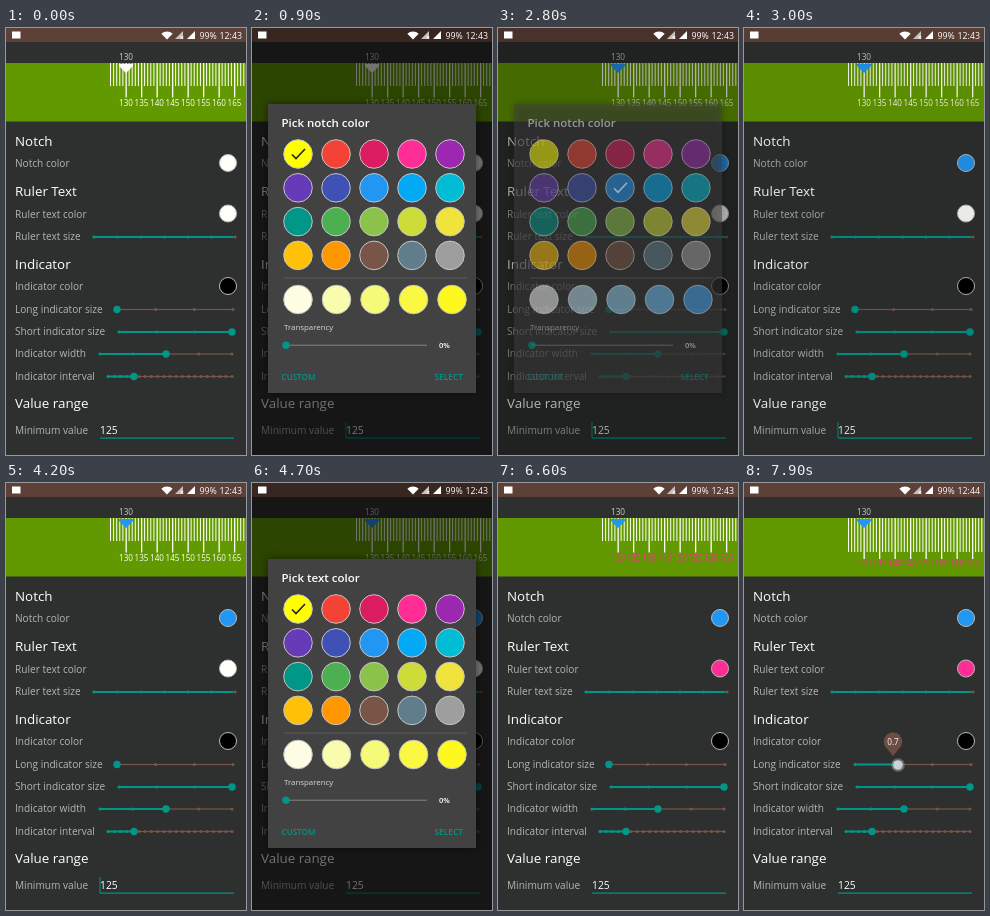
An HTML page with a canvas for the animation above (8000 ms loop, 240x427 px).

```html
<!DOCTYPE html>
<html lang="en">
<head>
<meta charset="utf-8">
<title>Ruler settings</title>
<style>
html, body { margin: 0; width: 100%; height: 100%; overflow: hidden; background: #2e302f; }
canvas { display: block; width: 100vw; height: 100vh; }
</style>
</head>
<body>
<canvas></canvas>
<script>
const canvas = document.querySelector('canvas');
const ctx = canvas.getContext('2d');
const W = 240, H = 427, LOOP = 8000;
const TEAL = '#009688', BROWN = '#795548', WHITE = '#fffffa', BLUE = '#2196f3', PINK = '#ff2d95';
const PALETTE = [
  '#ffff00', '#f44336', '#dc1c60', PINK, '#9c27b0',
  '#673ab7', '#3f51b5', BLUE, '#03a9f4', '#00bcd4',
  TEAL, '#4caf50', '#8bc34a', '#cddc39', '#f0e33c',
  '#ffc107', '#ff9800', BROWN, '#607d8b', '#9e9e9e'
];
const SHADES = {
  0: ['#fcfde2', '#f8fcac', '#f5fb76', '#fbf843', '#fdf81e'],
  3: ['#fff5f0', '#fbd0e4', '#f5a0cb', '#fb6fb6', '#ff4aa5'],
  7: ['#f4f6f5', '#bcdff0', '#94cdee', '#70bff5', '#45a6f5']
};

// [time, value] steps, linear between neighbours
const SCRIM = [[600, 0], [900, 1], [2700, 1], [2800, .55], [2900, .3], [3000, .14], [3100, 0],
  [4200, 0], [4500, 1], [6400, 1], [6500, .4], [6600, 0]];
const DIALOG = [[500, 0], [800, 1], [2700, 1], [2800, .5], [2900, 0],
  [4200, 0], [4500, 1], [6400, 1], [6500, .3], [6600, 0]];
const DRAG = [[7400, 111], [7500, 115], [7600, 126], [7700, 139], [7800, 149], [7900, 152]];
// start, end, x, y
const TOUCHES = [
  [300, 600, 222, 136], [1700, 1900, 127, 166], [2200, 2500, 200, 343],
  [3900, 4100, 222, 186], [5600, 5900, 161, 127], [6200, 6400, 200, 343]
];

function at(steps, t) {
  if (t <= steps[0][0]) return steps[0][1];
  for (let i = 1; i < steps.length; i++) {
    const [t0, a] = steps[i - 1], [t1, b] = steps[i];
    if (t <= t1) return a + (b - a) * (t - t0) / (t1 - t0);
  }
  return steps[steps.length - 1][1];
}

function rect(x, y, w, h, color) {
  ctx.fillStyle = color;
  ctx.fillRect(x, y, w, h);
}

function disc(x, y, r, color, stroke) {
  ctx.beginPath();
  ctx.arc(x, y, r, 0, Math.PI * 2);
  ctx.fillStyle = color;
  ctx.fill();
  if (stroke) { ctx.strokeStyle = stroke; ctx.lineWidth = 1; ctx.stroke(); }
}

function poly(points, color) {
  ctx.beginPath();
  points.forEach(p => ctx.lineTo(...p));
  ctx.fillStyle = color;
  ctx.fill();
}

function text(s, x, y, size, color, align = 'left', weight = 400) {
  ctx.font = `${weight} ${size}px "Open Sans", "Noto Sans", sans-serif`;
  ctx.textAlign = align;
  ctx.fillStyle = color;
  ctx.fillText(s, x, y);
}

function slider(x0, x1, y, steps, value, thumb = true) {
  rect(x0, y - .6, x1 - x0, 1.2, BROWN);
  rect(x0, y - 1, value - x0, 2, TEAL);
  for (let i = 0; i <= steps; i++) {
    const x = x0 + (x1 - x0) * i / steps;
    disc(x, y, 1.6, x <= value ? TEAL : BROWN);
  }
  if (thumb) disc(value, y, 3.7, TEAL);
}

function touch(x, y, alpha = 1) {
  ctx.globalAlpha = alpha;
  disc(x, y, 6.8, 'rgba(150,150,150,.55)');
  disc(x, y, 4.8, 'rgba(225,230,232,.8)');
  ctx.globalAlpha = 1;
}

function statusBar(t, dim) {
  rect(0, 0, W, 14, '#5d4037');
  rect(0, 0, W, 14, `rgba(0,0,0,${dim * .4})`);
  rect(6, 3.5, 8.5, 7, '#fff');
  ctx.beginPath();
  ctx.moveTo(161, 11.5);
  ctx.arc(161, 11.5, 8, -Math.PI * .75, -Math.PI * .25);
  ctx.fillStyle = '#fff';
  ctx.fill();
  poly([[169, 11], [177, 11], [177, 3]], '#c9bfbc');
  text('×', 176, 12, 7, '#fff', 'center', 700);
  poly([[181, 11], [189, 11], [189, 3]], '#fff');
  text('99%', 193.5, 10.5, 8.8, '#fff');
  text(t < 7400 ? '12:43' : '12:44', 236, 10.5, 8.8, '#fff', 'right');
}

function ruler(notch, label, grown) {
  text('130', 120, 32, 8.2, '#ccc', 'center');
  rect(0, 35, W, 58.5, '#629900');
  const shortEnd = grown ? 69 : 58, longEnd = grown ? 76 : 69.5;
  for (let i = 0; i < 45; i++) {
    const x = 104.5 + i * 3.1, long = i > 0 && i % 5 === 0;
    rect(x - .5, 35, long ? 1.3 : 1, (long ? longEnd : shortEnd) - 35, '#fffffa');
    if (long) text(String(125 + i), x, grown ? 83 : 78, 8.1, label, 'center');
  }
  poly([[113, 36], [127, 36], [127, 38], [120, 45], [113, 38]], notch);
}

function settings(t, notch, label) {
  const heads = [['Notch', 117.5], ['Ruler Text', 168], ['Indicator', 240.5], ['Value range', 380]];
  const rows = [['Notch color', 139], ['Ruler text color', 189.5], ['Ruler text size', 212],
    ['Indicator color', 262], ['Long indicator size', 284.5], ['Short indicator size', 307],
    ['Indicator width', 329], ['Indicator interval', 351.5], ['Minimum value', 405.5]];
  heads.forEach(([s, y]) => text(s, 9, y, 13.4, '#fff'));
  rows.forEach(([s, y]) => text(s, 9, y, 10.1, '#b4b5b4'));
  disc(222, 135, 8.5, notch, '#b9b9b9');
  disc(222, 185.5, 8.5, label, '#b9b9b9');
  disc(222, 258, 8.5, '#000', '#b9b9b9');
  slider(88, 229, 209, 6, 227, false);
  slider(111, 227, 281.5, 3, at(DRAG, t));
  slider(113, 226, 304, 3, 226);
  slider(94, 226, 326, 4, 160);
  slider(102, 226, 348.5, 20, 128);
  text('125', 94, 405.5, 10.3, '#fff');
  rect(94, 409.5, 134, 1.2, TEAL);
  if (t >= 400 && t < 4300) rect(93.5, 394, 1, 16, TEAL);
}

function dialog(title, picked) {
  ctx.shadowColor = 'rgba(0,0,0,.5)';
  ctx.shadowBlur = 8;
  rect(16, 76, 208, 289, '#424242');
  ctx.shadowBlur = 0;
  text(title, 29.5, 98.5, 11.5, '#fff', 'left', 600);
  PALETTE.forEach((color, i) => {
    const x = 46 + i % 5 * 38, y = 126 + Math.floor(i / 5) * 33.8;
    disc(x, y, 14.3, color, '#c4c4c4');
    if (i !== picked) return;
    ctx.beginPath();
    ctx.moveTo(x - 6, y + .5);
    ctx.lineTo(x - 2, y + 4.5);
    ctx.lineTo(x + 7, y - 5);
    ctx.strokeStyle = picked ? '#fff' : '#222';
    ctx.lineWidth = 1.6;
    ctx.stroke();
  });
  rect(32, 249.5, 183, 1, '#5c5c5c');
  SHADES[picked].forEach((color, i) => disc(46 + i * 38.5, 271.5, 14.3, color, '#c4c4c4'));
  text('Transparency', 32, 302, 7.9, '#d8d8d8');
  rect(34, 316.7, 141, 1, '#858585');
  disc(34, 317.2, 3.7, TEAL);
  text('0%', 187, 320.3, 7.6, '#fff', 'left', 600);
  text('CUSTOM', 29.5, 352, 8.1, TEAL, 'left', 600);
  text('SELECT', 211, 352, 8.4, TEAL, 'right', 600);
}

function bubble(x, value) {
  disc(x, 258.5, 9.3, '#6d4c41');
  poly([[x - 8, 263], [x + 8, 263], [x, 273]], '#6d4c41');
  text(value, x, 261.5, 8.2, '#fff', 'center');
}

function draw(t) {
  const notch = t < 2800 ? WHITE : BLUE;
  const label = t < 6500 ? WHITE : PINK;
  const scrim = at(SCRIM, t), shown = at(DIALOG, t);
  rect(0, 0, W, H, '#2e302f');
  ruler(notch, label, t >= 7700);
  settings(t, notch, label);
  rect(0, 14, W, H - 14, `rgba(0,0,0,${scrim * .55})`);
  statusBar(t, scrim);
  if (shown > 0) {
    const first = t < 3500;
    const picked = first ? (t < 1700 ? 0 : 7) : (t < 5700 ? 0 : 3);
    ctx.globalAlpha = shown;
    dialog(first ? 'Pick notch color' : 'Pick text color', picked);
    ctx.globalAlpha = 1;
  }
  for (const [start, end, x, y] of TOUCHES) {
    if (t >= start && t < end + 100) touch(x, y, t === end ? .55 : 1);
  }
  if (t >= 7400) {
    const x = at(DRAG, t);
    if (t >= 7500) bubble(Math.min(x, 149), t < 7700 ? '0.6' : '0.7');
    touch(x + 2, 282);
  }
}

function frame(now) {
  const ratio = window.devicePixelRatio || 1;
  const w = Math.round(innerWidth * ratio), h = Math.round(innerHeight * ratio);
  if (canvas.width !== w || canvas.height !== h) { canvas.width = w; canvas.height = h; }
  ctx.setTransform(w / W, 0, 0, h / H, 0, 0);
  draw(Math.floor(now % LOOP / 100) * 100);
  requestAnimationFrame(frame);
}
requestAnimationFrame(frame);
</script>
</body>
</html>
```
